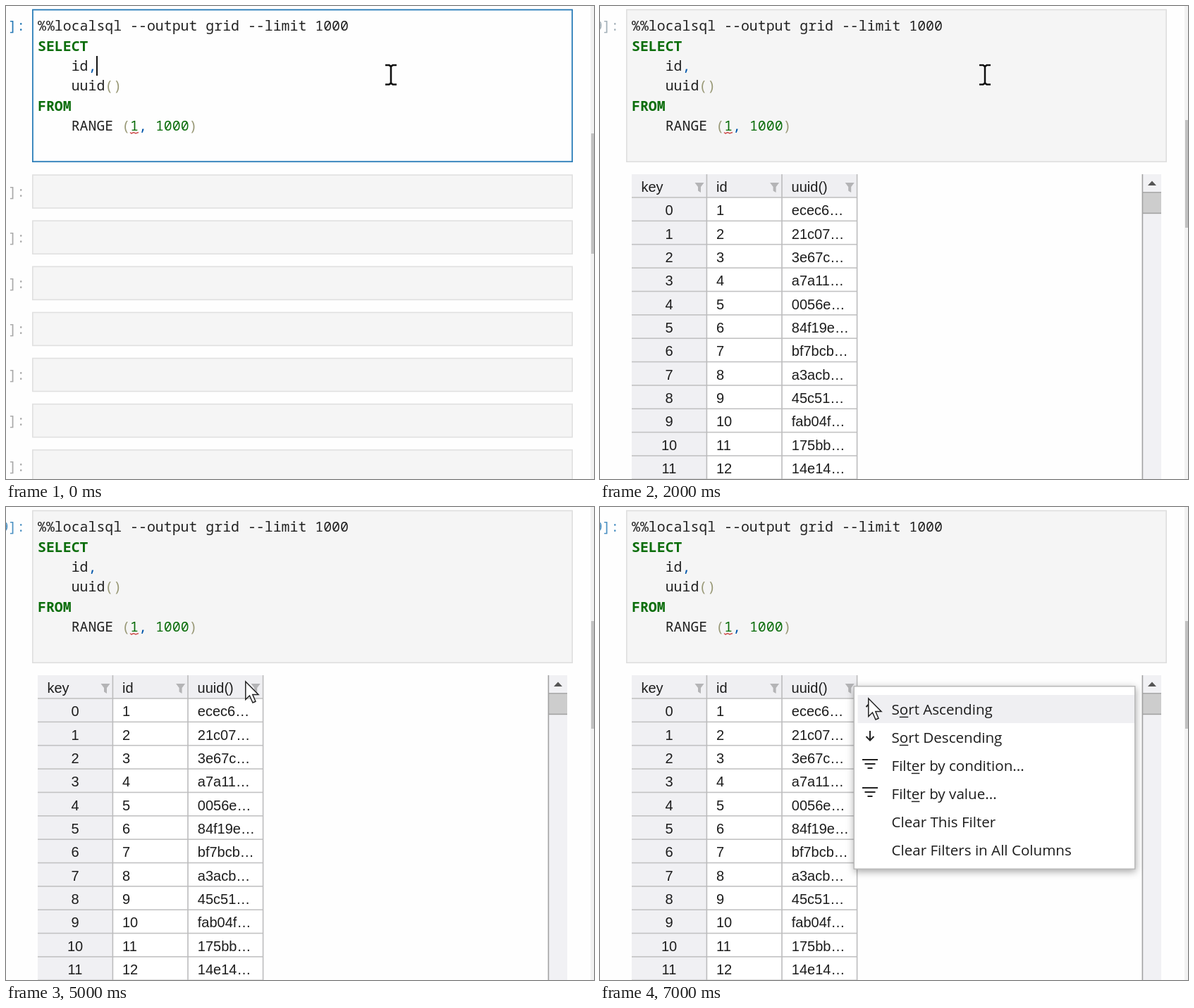
Write an HTML page with a canvas that moves like this. It is 834x672 px and loops after 8 s.

```html
<!DOCTYPE html>
<html lang="en">
<head>
<meta charset="utf-8">
<title>Notebook grid</title>
<style>
  html, body { margin: 0; width: 100%; height: 100%; overflow: hidden; background: #fefefe; }
  canvas { display: block; }
</style>
</head>
<body>
<canvas id="stage" width="834" height="672"></canvas>
<script>
const ctx = document.getElementById('stage').getContext('2d');
const MONO = '19.87px "Noto Sans Mono", monospace';
const SANS = '20px "Liberation Sans", Arial, sans-serif';
const MENU = '20.6px "Open Sans", sans-serif';
const CHAR = 11.92, LINE = 28.4, ROW = 33.36, COL = 106.6;
const INK = '#222', GREEN = '#0b6d0b', BLUE = '#2478b5', PAREN = '#999977', COMMA = '#0055aa';

// Each piece: line, column, text, colour, bold
const code = [
  [0, 0, '%%localsql --output grid --limit 1000', INK],
  [1, 0, 'SELECT', GREEN, true],
  [2, 4, 'id', INK], [2, 6, ',', COMMA],
  [3, 4, 'uuid', INK], [3, 8, '()', PAREN],
  [4, 0, 'FROM', GREEN, true],
  [5, 4, 'RANGE', INK], [5, 10, '(', PAREN], [5, 11, '1', GREEN],
  [5, 12, ',', COMMA], [5, 14, '1000', GREEN], [5, 18, ')', PAREN],
];
const ids = ['ecec6', '21c07', '3e67c', 'a7a11', '0056e', '84f19e',
             'bf7bcb', 'a3acb', '45c51', 'fab04f', '175bb', '14e14'];
const menuItems = ['Sort Ascending', 'Sort Descending', 'Filter by condition...',
                   'Filter by value...', 'Clear This Filter', 'Clear Filters in All Columns'];
// Pointer position for each second from the third on
const pointer = [[435, 247], [369, 254], [339, 247], [360, 254.5], [380, 271]];

function rect(x, y, w, h, color) {
  ctx.fillStyle = color;
  ctx.fillRect(x, y, w, h);
}

function text(str, x, y, font, color = '#1c1c1c', align = 'left') {
  ctx.font = font;
  ctx.fillStyle = color;
  ctx.textAlign = align;
  ctx.fillText(str, x, y);
}

function shape(points, fill, stroke, width = 1) {
  ctx.beginPath();
  points.forEach(([x, y]) => ctx.lineTo(x, y));
  ctx.closePath();
  ctx.fillStyle = fill;
  ctx.fill();
  if (stroke) line(null, stroke, width);
}

function line(points, color, width) {
  if (points) {
    ctx.beginPath();
    points.forEach(([x, y], i) => i ? ctx.lineTo(x, y) : ctx.moveTo(x, y));
  }
  ctx.strokeStyle = color;
  ctx.lineWidth = width;
  ctx.stroke();
}

function box(y, h, border, fill) {
  rect(37, y, 767, h, border);
  rect(38.6, y + 1.6, 763.8, h - 3.2, fill);
}

function pageScrollbar(y, h) {
  rect(829, 0, 5, 672, '#f2f2f2');
  rect(830, y, 4, h, '#c1c1c1');
}

function drawCode() {
  for (const [row, col, str, color, bold] of code)
    text(str, 45 + col * CHAR, 35.2 + row * LINE, (bold ? 'bold ' : '') + MONO, color);
  line([[176, 179.5], [178, 181], [181, 179.5], [184, 181], [188, 179.5]], '#d05050', 1.5);
}

function drawEditing() {
  box(4.5, 217.5, BLUE, '#cfe4f2');
  rect(39.5, 7, 762, 212.5, '#fefefe');
  text(']:', 3.3, 35.2, MONO, BLUE);
  drawCode();
  rect(128, 71, 2, 28, '#111');
  for (let i = 0; i < 7; i++) {
    const y = 239.3 + i * 65.1;
    box(y, 48.6, '#e0e0e0', '#f5f5f5');
    text(']:', 3.3, y + 31.5, MONO, '#a9a9a9');
  }
  pageScrollbar(181, 171);
}

function drawFunnel(x) {
  shape([[x - 6.5, 251], [x + 6.5, 251], [x + 2, 257], [x + 2, 265], [x - 2, 262.5], [x - 2, 257]], '#b4b4b6');
}

function drawGrid() {
  rect(45, 239, 319.8, 433, '#fff');
  rect(45, 239, 319.8, 33, '#efeff2');
  rect(45, 239, COL, 433, '#f0f0f3');
  for (let i = 0; i < 13; i++) rect(45, 271.2 + i * ROW, 320, 1.6, '#c2c2c3');
  ['key', 'id', 'uuid()'].forEach((name, i) => {
    rect(150.6 + i * COL, 239, 1.6, 433, '#bcbcbd');
    text(name, 58.4 + i * COL, 263.8, SANS);
    drawFunnel(141 + i * COL);
  });
  ids.forEach((id, i) => {
    const y = 297.2 + i * ROW;
    text(i, 98, y, SANS, undefined, 'center');
    text(i + 1, 165, y, SANS);
    text(id + '…', 271.8, y, SANS);
  });

  rect(769, 239, 27, 433, '#f1f1f4');
  rect(769, 264.5, 27, 30.5, '#cdcdcd');
  rect(769, 264, 27, 1.5, '#a8a8a8');
  rect(769, 293.7, 27, 1.5, '#a0a0a0');
  rect(768.6, 239, 1.6, 433, '#a2a2a2');
  shape([[777, 255], [783, 248.5], [789, 255]], '#555');
}

function drawResult(promptColor) {
  box(4.5, 217.5, '#dedede', '#f5f5f5');
  text('9]:', 3.3 - CHAR, 35.2, MONO, promptColor);
  drawCode();
  drawGrid();
  pageScrollbar(162, 153);
}

function drawArrowIcon(y, dir) {
  line([[383, y - 7 * dir], [383, y + 6 * dir]], INK, 2);
  line([[377.5, y + dir], [383, y + 6.5 * dir], [388.5, y + dir]], INK, 2);
}

function drawMenu() {
  ctx.save();
  ctx.shadowColor = 'rgba(0,0,0,.35)';
  ctx.shadowBlur = 10;
  ctx.shadowOffsetY = 3;
  rect(359.5, 254, 400, 261, '#b9b9b9');
  ctx.restore();
  rect(361, 255.5, 397, 258, '#fff');
  rect(365.5, 267, 392.5, 40, '#efeff2');

  menuItems.forEach((label, i) => {
    const y = 288 + i * 40;
    text(label, 413.5, y + 7.3, MENU);
    if (i < 4) {
      const at = i < 2 ? 1 : 4;
      const start = ctx.measureText(label.slice(0, at)).width;
      rect(413.5 + start, y + 9.7, ctx.measureText(label[at]).width, 1.5, INK);
    }
    if (i === 2 || i === 3)
      [22, 15, 7].forEach((w, k) => rect(383 - w / 2, y - 10 + k * 6, w, 2, INK));
  });
  drawArrowIcon(285, -1);
  drawArrowIcon(325, 1);
}

function drawBeam() {
  const beam = [[538, 84], [543.5, 84], [546, 86], [548.5, 84], [554, 84]];
  const foot = beam.map(([x, y]) => [x, 195.5 - y]);
  for (const [color, width] of [['#fff', 5], ['#111', 2.6]]) {
    line(beam, color, width);
    line(foot, color, width);
    line([[546, 85], [546, 110.5]], color, width);
  }
}

function drawPointer([x, y]) {
  const outline = [[0.8, 1], [0.8, 26.5], [6.5, 21], [11, 31], [15, 29.3], [10.8, 19.5], [19, 19.5]];
  shape(outline.map(([dx, dy]) => [x + dx, y + dy]), '#fff', '#222', 1.5);
}

function frame() {
  const second = Math.floor(performance.now() % 8000 / 1000);
  rect(0, 0, 834, 672, '#fefefe');
  if (second < 2) drawEditing();
  else drawResult(second === 2 ? '#a3b0b8' : '#4a90c2');
  if (second === 7) drawMenu();
  if (second < 3) drawBeam();
  else drawPointer(pointer[second - 3]);
  requestAnimationFrame(frame);
}
frame();
</script>
</body>
</html>
```
